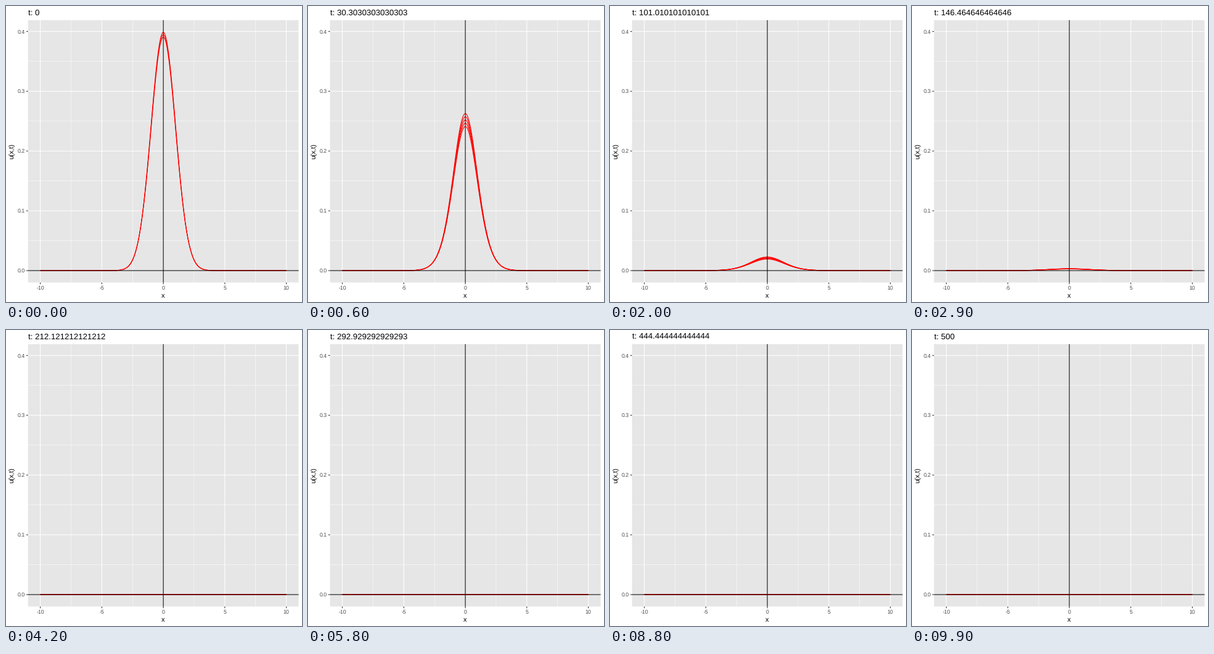
A matplotlib script that plays this animation: 480x480 px, repeating every 10 s.

```python
import matplotlib.pyplot as plt
import numpy as np
from matplotlib.animation import FuncAnimation
from matplotlib.collections import LineCollection
from matplotlib.patches import Rectangle

SIZE, DPI = 480, 72          # at 72 dpi one point is one pixel
FRAMES, T_END = 100, 500
LEFT, RIGHT, TOP, BOTTOM = 35.7, 474.5, 23.0, 448.4
THICK, THIN = 1.07, 0.53

plt.rcParams.update({
    "font.family": "Liberation Sans",
    "text.hinting": "none",
    "path.snap": False,
    "path.simplify": False,
})

# Bistable reaction-diffusion: u_t = D u_xx + r u (1 - u)(u - a)
D, R, A = 0.01, 0.1, 0.4
SUBSTEPS = 5
x = np.linspace(-10, 10, 201)
dx = x[1] - x[0]


def solve():
    u = np.exp(-x**2 / 2) / np.sqrt(2 * np.pi)
    states = [u]
    dt = 1 / SUBSTEPS
    for _ in range(T_END):
        for _ in range(SUBSTEPS):
            pad = np.pad(u, 1, mode="edge")
            lap = (pad[2:] - 2 * u + pad[:-2]) / dx**2
            u = u + dt * (D * lap + R * u * (1 - u) * (u - A))
        states.append(u)
    return np.array(states)


states = solve()
peak = states[0].max()


def px(v):
    return LEFT + (v + 11) / 22 * (RIGHT - LEFT)


def py(v):
    return BOTTOM - (v / peak + 0.05) / 1.1 * (BOTTOM - TOP)


# Each whole-number time belongs to its nearest animation frame
slot = np.rint(np.arange(T_END + 1) * (FRAMES - 1) / T_END).astype(int)
curves = [np.column_stack([px(x), py(u)]) for u in states]

fig = plt.figure(figsize=(SIZE / DPI, SIZE / DPI), dpi=DPI, facecolor="white")
ax = fig.add_axes([0, 0, 1, 1])
ax.set_xlim(0, SIZE)
ax.set_ylim(SIZE, 0)
ax.axis("off")


def line(x0, y0, x1, y1, color, width, z):
    ax.plot([x0, x1], [y0, y1], color=color, lw=width, zorder=z,
            solid_capstyle="butt", snap=False)


def hline(v, color, width, z):
    line(LEFT, py(v), RIGHT, py(v), color, width, z)


def vline(v, color, width, z):
    line(px(v), TOP, px(v), BOTTOM, color, width, z)


def label(x0, y0, s, size, color="black", **kw):
    return ax.text(x0, y0, s, fontsize=size, color=color, **kw)


ax.add_patch(Rectangle((LEFT, TOP), RIGHT - LEFT, BOTTOM - TOP,
                       fc="#e6e6e6", ec="none", zorder=0))

for v in (-7.5, -2.5, 2.5, 7.5):
    vline(v, "white", THIN, 1)
for v in (0.05, 0.15, 0.25, 0.35):
    hline(v, "white", THIN, 1)

for v in (-10, -5, 0, 5, 10):
    vline(v, "white", THICK, 2)
    line(px(v), BOTTOM, px(v), BOTTOM + 2.75, "#333333", THICK, 2)
    label(px(v), 459.9, str(v), 8.8, "#4d4d4d", ha="center", va="baseline")
for v in (0, 0.1, 0.2, 0.3, 0.4):
    hline(v, "white", THICK, 2)
    line(LEFT - 2.75, py(v), LEFT, py(v), "#333333", THICK, 2)
    label(30.7, py(v) + 3.15, f"{v:.1f}", 8.8, "#4d4d4d",
          ha="right", va="baseline")

label((LEFT + RIGHT) / 2, 472.6, "x", 11, ha="center", va="baseline")
label(13.4, (TOP + BOTTOM) / 2, "u(x,t)", 11, rotation=90,
      rotation_mode="anchor", ha="center", va="baseline")
title = label(LEFT, 15.0, "", 13.2, ha="left", va="baseline")

waves = LineCollection([], colors="red", linewidths=THICK, zorder=3)
waves.set_snap(False)
ax.add_collection(waves, autolim=False)

hline(0, "black", THICK, 4)
vline(0, "black", THICK, 4)


def update(i):
    title.set_text(f"t: {i * (T_END / (FRAMES - 1)):.15g}")
    waves.set_segments([curves[n] for n in np.flatnonzero(slot == i)])
    return title, waves


anim = FuncAnimation(fig, update, frames=FRAMES, interval=100,
                     repeat=True, repeat_delay=0)
plt.show()
```
